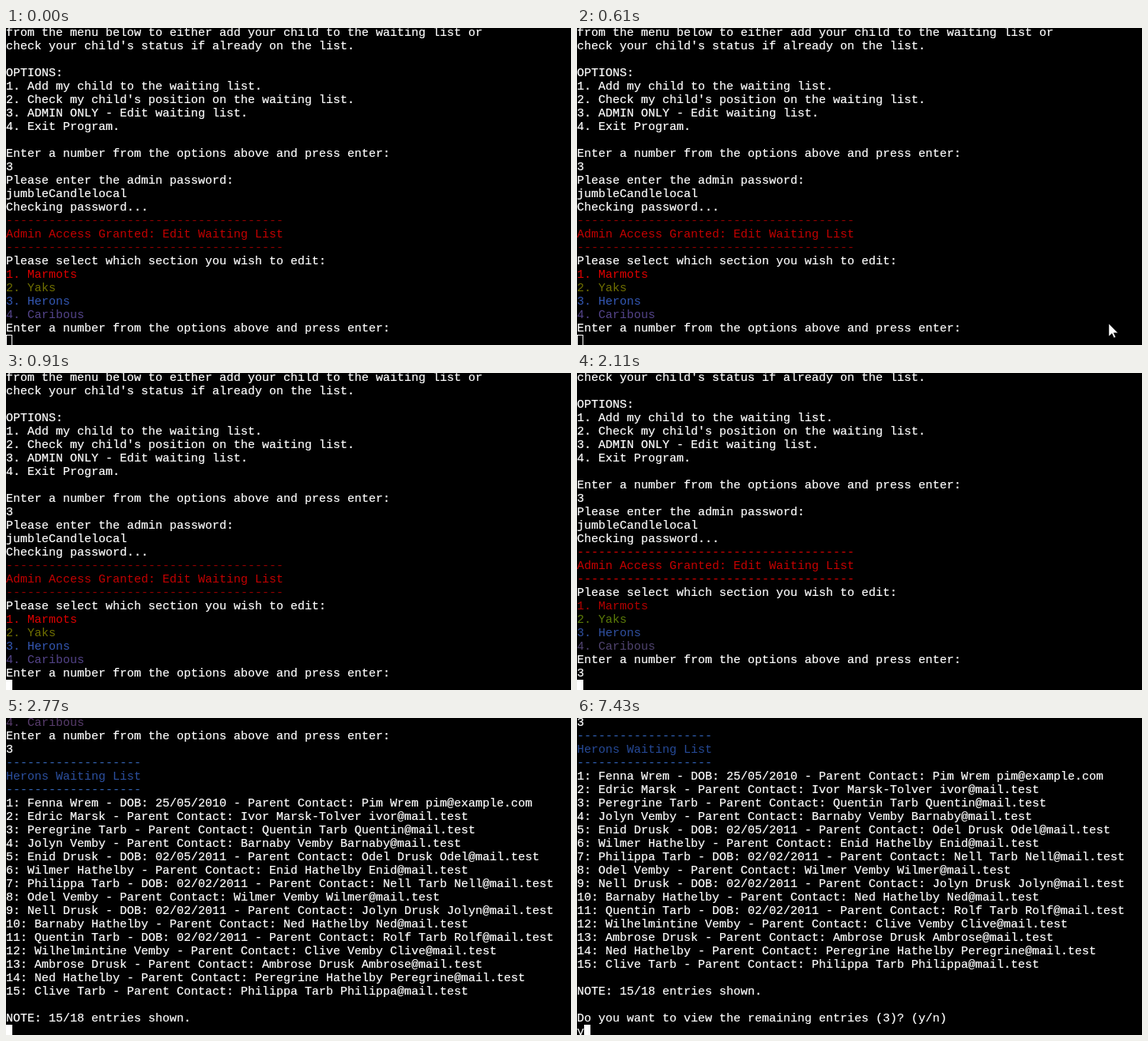
Animation of 715 by 401 pixels, one loop 8 s. Source, as an HTML page:

```html
<!DOCTYPE html>
<html lang="en">
<head>
<meta charset="utf-8">
<title>Waiting list terminal</title>
<style>
  html, body { margin: 0; width: 100%; height: 100%; overflow: hidden; background: #000; }
  svg { display: block; width: 715px; height: 401px; background: #000; }
  text { font: 15px "Liberation Mono", "Courier New", monospace; white-space: pre; }
</style>
</head>
<body>
<svg id="stage" viewBox="0 0 715 401"></svg>
<script>
const LOOP = 8000, ROWS = 24, ROW_HEIGHT = 17, CHAR_WIDTH = 9;
const FIRST_TOP = -3, BASELINE = 13, CURSOR_TOP = 388;
const stage = document.getElementById('stage');

function add(tag, attributes) {
  const node = document.createElementNS('http://www.w3.org/2000/svg', tag);
  for (const key in attributes) node.setAttribute(key, attributes[key]);
  return stage.appendChild(node);
}

const entry = (child, parent, mail, born) =>
  child + (born ? ' - DOB: ' + born : '') + ' - Parent Contact: ' + parent + ' ' + mail;
const PROMPT = 'Enter a number from the options above and press enter:';

const entries = [
  entry('Fenna Wrem', 'Pim Wrem', 'pim@example.com', '25/05/2010'),
  entry('Edric Marsk', 'Ivor Marsk-Tolver', 'ivor@mail.test'),
  entry('Peregrine Tarb', 'Quentin Tarb', 'Quentin@mail.test'),
  entry('Jolyn Vemby', 'Barnaby Vemby', 'Barnaby@mail.test'),
  entry('Enid Drusk', 'Odel Drusk', 'Odel@mail.test', '02/05/2011'),
  entry('Wilmer Hathelby', 'Enid Hathelby', 'Enid@mail.test'),
  entry('Philippa Tarb', 'Nell Tarb', 'Nell@mail.test', '02/02/2011'),
  entry('Odel Vemby', 'Wilmer Vemby', 'Wilmer@mail.test'),
  entry('Nell Drusk', 'Jolyn Drusk', 'Jolyn@mail.test', '02/02/2011'),
  entry('Barnaby Hathelby', 'Ned Hathelby', 'Ned@mail.test'),
  entry('Quentin Tarb', 'Rolf Tarb', 'Rolf@mail.test', '02/02/2011'),
  entry('Wilhelmintine Vemby', 'Clive Vemby', 'Clive@mail.test'),
  entry('Ambrose Drusk', 'Ambrose Drusk', 'Ambrose@mail.test'),
  entry('Ned Hathelby', 'Peregrine Hathelby', 'Peregrine@mail.test'),
  entry('Clive Tarb', 'Philippa Tarb', 'Philippa@mail.test')
];

// Each line is plain text, or [text, colour name].
const lines = [
  'from the menu below to either add your child to the waiting list or',
  "check your child's status if already on the list.",
  '',
  'OPTIONS:',
  '1. Add my child to the waiting list.',
  "2. Check my child's position on the waiting list.",
  '3. ADMIN ONLY - Edit waiting list.',
  '4. Exit Program.',
  '',
  PROMPT,
  '3',
  'Please enter the admin password:',
  'jumbleCandlelocal',
  'Checking password...',
  ['-'.repeat(39), 'adminRule'],
  ['Admin Access Granted: Edit Waiting List', 'admin'],
  ['-'.repeat(39), 'adminRule'],
  'Please select which section you wish to edit:',
  ['1. Marmots', 'red'],
  ['2. Yaks', 'olive'],
  ['3. Herons', 'blue'],
  ['4. Caribous', 'purple'],
  PROMPT,
  '3',
  ['-'.repeat(19), 'listRule'],
  ['Herons Waiting List', 'list'],
  ['-'.repeat(19), 'listRule'],
  ...entries.map((text, i) => `${i + 1}: ${text}`),
  '',
  'NOTE: 15/18 entries shown.',
  '',
  'Do you want to view the remaining entries (3)? (y/n)'
];

const menuColours = { adminRule: '#900000', admin: '#c40000', red: '#e00000',
  olive: '#707000', blue: '#3458b4', purple: '#54448a' };
const chosenColours = { adminRule: '#d80000', admin: '#c80000', red: '#b40000',
  olive: '#5c7c08', blue: '#3050a0', purple: '#504470' };
const listColours = { purple: '#583c6c', listRule: '#3464b4', list: '#2c50a0' };
const endColours = { listRule: '#3060b4', list: '#264a98' };

const scenes = [
  { at: 0, shown: 23, typed: '', colours: menuColours },
  { at: 1710, shown: 23, typed: '3', colours: menuColours },
  { at: 2110, shown: 24, typed: '', colours: chosenColours },
  { at: 2770, shown: 44, typed: '', colours: listColours },
  { at: 2870, shown: 46, typed: '', colours: endColours },
  { at: 7430, shown: 46, typed: 'y', colours: endColours }
];

const rows = Array.from({ length: ROWS }, (_, i) =>
  add('text', { x: 0, y: FIRST_TOP + BASELINE + i * ROW_HEIGHT }));
const cursor = add('rect', { y: CURSOR_TOP + 0.5, width: 7, height: 16, stroke: '#fff' });
const pointer = add('path', {
  d: 'M0 0V16L4 12.5L6.5 18L8.7 17L6.2 11.7H11.5Z', fill: '#fff', stroke: '#000', 'stroke-width': 0.5
});

// Pointer tip positions: [ms, x, y]
const route = [[400, 652, 398], [500, 664, 384], [610, 673, 374],
  [680, 673, 374], [740, 675, 361], [910, 674, 402]];
const FOCUS_AT = 740;

function pointerAt(time) {
  const i = route.findIndex(([at], k) => k && time < at);
  if (time < route[0][0] || i < 0) return null;
  const [t0, x0, y0] = route[i - 1], [t1, x1, y1] = route[i];
  const p = (time - t0) / (t1 - t0);
  return [x0 + (x1 - x0) * p, y0 + (y1 - y0) * p].map(Math.round);
}

let current;
function showScene(scene) {
  if (scene === current) return;
  current = scene;
  const visible = [...lines.slice(0, scene.shown), scene.typed].slice(-ROWS);
  rows.forEach((row, i) => {
    const [text, colour] = [visible[i]].flat();
    const fill = scene.colours[colour] || '#fff';
    row.textContent = text;
    row.setAttribute('fill', fill);
    row.setAttribute('stroke', fill);
    row.setAttribute('stroke-width', colour ? 0 : 0.2);
  });
  cursor.setAttribute('x', scene.typed.length * CHAR_WIDTH + 0.5);
}

function draw(time) {
  showScene(scenes.findLast(scene => time >= scene.at));
  cursor.setAttribute('fill', time < FOCUS_AT ? 'none' : '#fff');
  const tip = pointerAt(time);
  pointer.setAttribute('visibility', tip ? 'visible' : 'hidden');
  if (tip) pointer.setAttribute('transform', `translate(${tip})`);
}

const start = performance.now();
function tick() {
  draw((performance.now() - start) % LOOP);
  requestAnimationFrame(tick);
}
tick();
</script>
</body>
</html>
```
